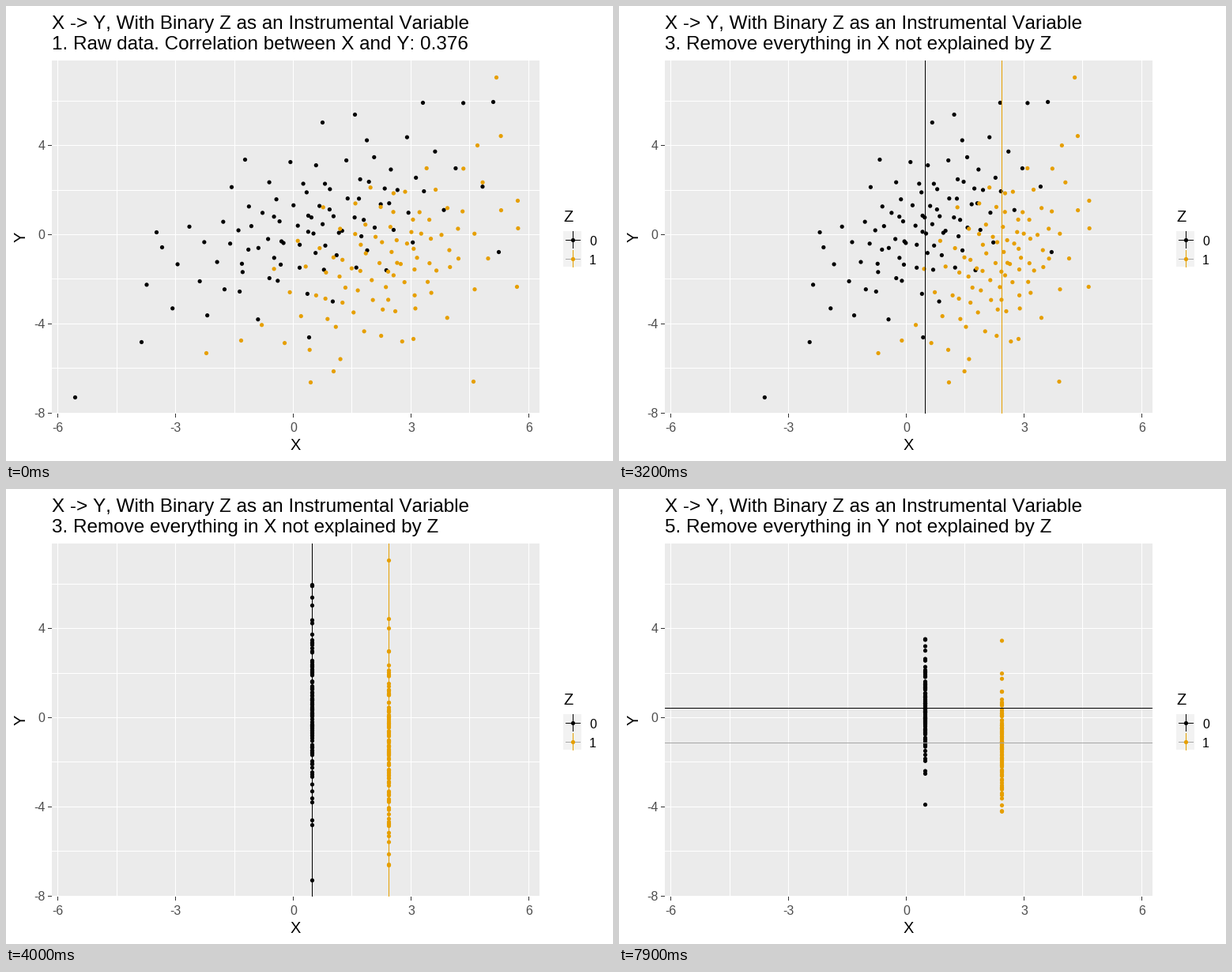
Write a matplotlib script that moves like this. It is 768x576 px and loops after 8 s.

```python
import numpy as np
import matplotlib.pyplot as plt
from matplotlib.animation import FuncAnimation
from matplotlib.patches import Rectangle

plt.rcParams["font.family"] = "Liberation Sans"
plt.rcParams["text.kerning_factor"] = 6

W, H, DPI = 768, 576, 96
PT = 72 / DPI
STEP_MS, LOOP_MS = 100, 8000
LEFT, TOP, RIGHT, BOTTOM = 58, 69, 675, 516
X0, Y0, X_UNIT, Y_UNIT = 363, 289, 49.6, 28.2
BLACK, ORANGE, GREY, DARK = "#000000", "#E69F00", "#A6A6A6", "#333333"
MEAN_0, MEAN_1 = (387, 277), (484, 321)
GROUP_SIZE, MOVE_STEPS = 100, 13

TITLE = "X -> Y, With Binary Z as an Instrumental Variable"
STAGES = [
    (0, "1. Raw data. Correlation between X and Y: 0.376"),
    (500, "2. What differences in X are explained by Z?"),
    (2800, "3. Remove everything in X not explained by Z"),
    (5100, "4. What differences in Y are explained by Z?"),
    (7400, "5. Remove everything in Y not explained by Z"),
]

# A few extreme points of each group, in stage pixels
EXTREMES_0 = [(87, 495), (171, 425), (383, 419), (190, 286), (302, 194),
              (400, 147), (441, 137), (527, 122), (616, 121), (623, 311)]
EXTREMES_1 = [(620, 90), (596, 176), (647, 246), (646, 355), (591, 475),
              (515, 421), (414, 462), (385, 476), (297, 423), (253, 439)]


def bell(u):
    """Approximate normal quantile of u in (0, 1)."""
    return 4.91 * (u ** 0.14 - (1 - u) ** 0.14)


def make_group(extremes, mean, x_sd, y_sd, slope, rng):
    """Evenly spread, sloping normal cloud around mean, plus extremes."""
    n = GROUP_SIZE - len(extremes)
    i = np.arange(1, n + 1)
    dx = x_sd * bell(i / (n + 1))
    dy = slope * dx + y_sd * bell(np.clip(i * 0.618034 % 1, 0.02, 0.98))
    cloud = mean + np.column_stack([dx, dy]) + rng.normal(0, 4, (n, 2))
    return np.vstack([extremes, cloud])


rng = np.random.default_rng(3)
points = np.vstack([
    make_group(EXTREMES_0, MEAN_0, 95, 46, -0.33, rng),
    make_group(EXTREMES_1, MEAN_1, 72, 53, -0.35, rng),
])
targets = np.repeat([MEAN_0, MEAN_1], GROUP_SIZE, axis=0)

fig = plt.figure(figsize=(W / DPI, H / DPI), dpi=DPI, facecolor="white")
ax = fig.add_axes([0, 0, 1, 1])
ax.set_xlim(0, W)
ax.set_ylim(H, 0)
ax.axis("off")


def rect(x0, y0, x1, y1, color):
    ax.add_patch(Rectangle((x0, y0), x1 - x0, y1 - y0, fc=color, lw=0,
                           zorder=0))


def line(xs, ys, color, z):
    return ax.plot(xs, ys, color=color, lw=PT, zorder=z, snap=False,
                   solid_capstyle="butt")[0]


def vline(x, color, y0=TOP, y1=BOTTOM, z=1):
    return line([x + 0.5, x + 0.5], [y0, y1], color, z)


def hline(y, color, x0=LEFT, x1=RIGHT, z=1):
    return line([x0, x1], [y + 0.5, y + 0.5], color, z)


def label(x, y, text, size, color="black", ha="left", va="baseline", **kw):
    return ax.text(x, y, text, fontsize=size * PT, color=color, ha=ha,
                   va=va, **kw)


def dots(pos, colors):
    pos = np.asarray(pos) + 0.5
    return ax.scatter(pos[:, 0], pos[:, 1], s=(5.2 * PT) ** 2, c=colors,
                      linewidths=0, zorder=3)


# Panel, grid and axes
rect(LEFT, TOP, RIGHT, BOTTOM, "#EBEBEB")
for v in np.arange(-6, 6.1, 1.5):
    x = round(X0 + v * X_UNIT)
    vline(x, "white")
    if v % 3 == 0:
        vline(x, DARK, BOTTOM, BOTTOM + 5)
        label(x + 0.5, 539, f"{v:.0f}", 16, "#4D4D4D", "center")
for v in range(-8, 7, 2):
    y = round(Y0 - v * Y_UNIT)
    hline(y, "white")
    if v % 4 == 0:
        hline(y, DARK, LEFT - 5, LEFT)
        label(49.5, y + 6, str(v), 16, "#4D4D4D", "right")
label(366.5, 562, "X", 20, ha="center")
label(19, 292.5, "Y", 20, ha="center", va="center", rotation=90)

# Legend
label(705, 273, "Z", 20)
rect(705, 285, 728, 330, "#F2F2F2")
for y, name, h_color, v_color in ((296, "0", BLACK, BLACK),
                                  (320, "1", GREY, ORANGE)):
    vline(717, v_color, y - 11, y + 11)
    hline(y, h_color, 708, 727)
    label(738, y + 7, name, 16)
dots([(717, 296), (717, 320)], [BLACK, ORANGE])

# Changing parts
label(58, 29, TITLE, 24.2)
subtitle = label(58, 55, "", 24.2)
cloud = dots(points, [BLACK] * GROUP_SIZE + [ORANGE] * GROUP_SIZE)
x_means = [vline(MEAN_0[0], BLACK, z=5), vline(MEAN_1[0], ORANGE, z=5)]
y_means = [hline(MEAN_0[1], BLACK, z=5), hline(MEAN_1[1], GREY, z=5)]


def progress(t, start):
    """Sine in-out, with its first visible step at start."""
    u = ((t - start) / STEP_MS + 1) / MOVE_STEPS
    return (1 - np.cos(np.pi * min(max(u, 0), 1))) / 2


def update(i):
    t = i * STEP_MS
    subtitle.set_text([text for start, text in STAGES if t >= start][-1])
    for ln in x_means:
        ln.set_visible(900 <= t < 5100)
    for ln in y_means:
        ln.set_visible(t >= 5500)
    ease = np.array([progress(t, 2800), progress(t, 7400)])
    cloud.set_offsets(points + (targets - points) * ease + 0.5)
    return [subtitle, cloud, *x_means, *y_means]


anim = FuncAnimation(fig, update, frames=LOOP_MS // STEP_MS,
                     interval=STEP_MS, repeat=True, repeat_delay=0)
plt.show()
```
